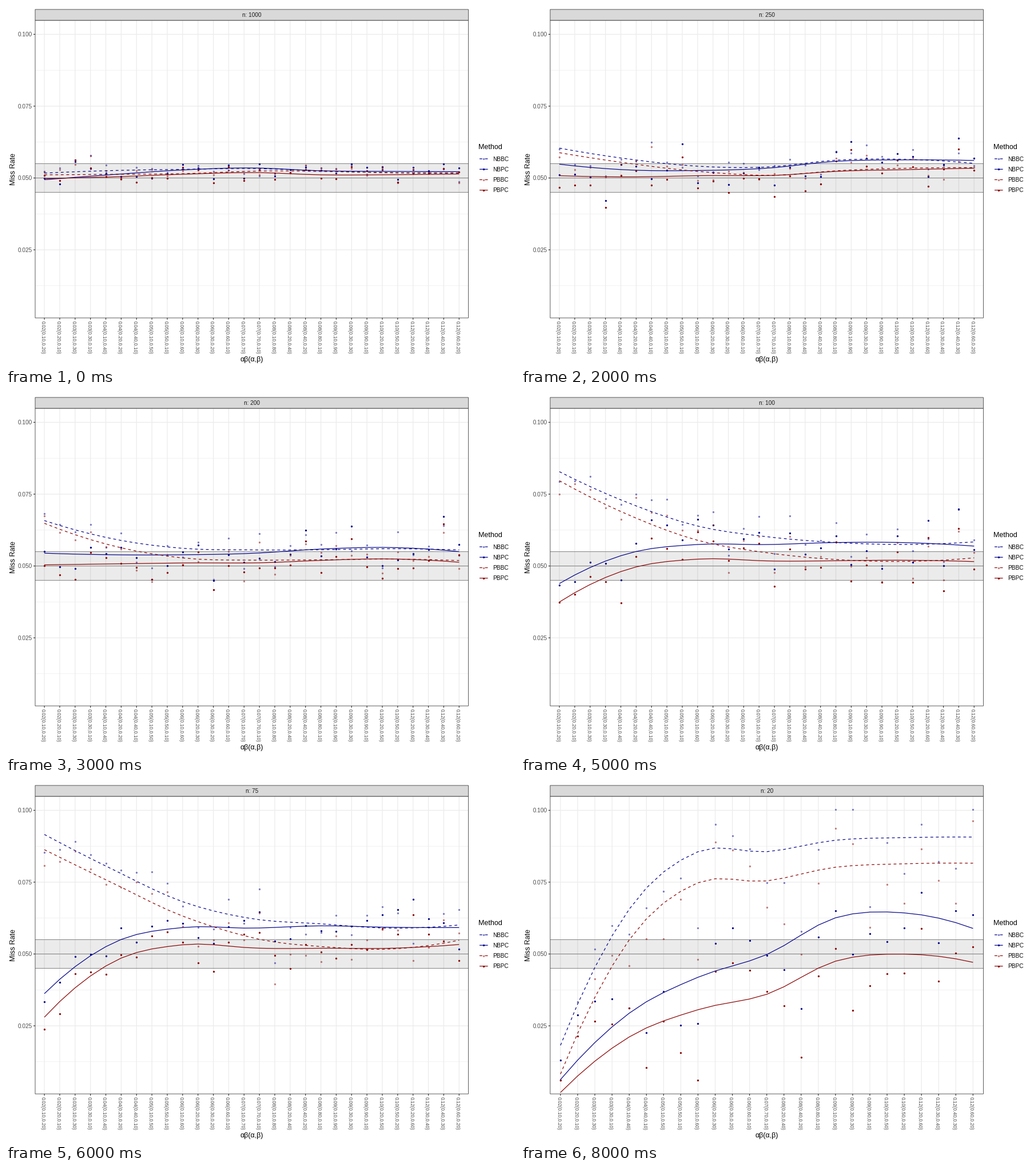
These frames come from a looping animation (890x629 px, 9 s). A matplotlib script:

```python
import numpy as np
import matplotlib.pyplot as plt
from matplotlib.animation import FuncAnimation
from matplotlib.patches import Rectangle

W, H, DPI = 890, 629, 100
LEFT, RIGHT, TOP, BOTTOM = 51, 808.4, 25, 545
NAVY, RED, INK, GRID = "#00008B", "#8B0000", "#333333", "#EBEBEB"
METHODS = {"NBBC": (NAVY, True), "NBPC": (NAVY, False),
           "PBBC": (RED, True), "PBPC": (RED, False)}
SIZES = [1000, 500, 250, 200, 150, 100, 75, 50, 20]

plt.rcParams["font.family"] = "Liberation Sans"


def pt(px):
    return px * 72 / DPI


def y_of(rate):
    return 300.5 - (rate - 0.05) * 5020


# Evenly spaced key points, in 1/10000: the NBBC and NBPC curves,
# then how far PBBC and PBPC lie below them.
keys = {}


def shape(n, *rows):
    keys[n] = [np.array(r, float) for r in rows]


def mix(n, a, b, t=0.5):
    keys[n] = [(1 - t) * p + t * q for p, q in zip(keys[a], keys[b])]


shape(1000, [517, 526, 530, 533, 525, 518, 517], [494, 512, 528, 535, 525, 523, 522],
      [6, 15, 2, -1], [-4, 15, 14, 8])
shape(250, [604, 566, 541, 538, 562, 565, 551], [548, 528, 526, 534, 558, 563, 561],
      [16, 18, 37, 15], [40, 18, 35, 27])
shape(150, [712, 622, 582, 574, 551, 555, 561], [541, 550, 552, 554, 560, 566, 539],
      [3, 49, 33, 59], [41, 39, 44, 47])
shape(75, [916, 793, 682, 623, 605, 590, 601], [362, 539, 592, 590, 598, 593, 592],
      [53, 50, 79, 53], [82, 60, 78, 59])
shape(50, [733, 855, 818, 746, 681, 660, 667], [215, 497, 618, 634, 632, 636, 630],
      [94, 70, 94, 90], [107, 79, 94, 68])
shape(20, [182, 656, 856, 856, 896, 905, 907], [63, 294, 419, 498, 626, 643, 589],
      [100, 108, 94, 91], [45, 113, 151, 118])
mix(500, 1000, 250)
mix(200, 250, 150)
mix(100, 150, 75, 0.57)

PAIRS = sorted(((a, b) for a in range(1, 10) for b in range(1, 10)
                if 2 <= a * b <= 12), key=lambda p: (p[0] * p[1], p[0]))
UNUSED_AT_20 = {(2, 2), (1, 7), (1, 8)}


def smooth(vals, count):
    """Cubic Hermite curve through evenly spaced values."""
    slope = np.gradient(vals, edge_order=2)
    u = np.linspace(0, len(vals) - 1, count)
    i = np.minimum(u.astype(int), len(vals) - 2)
    t = u - i
    return ((1 + 2 * t) * (1 - t) ** 2 * vals[i] + t * (1 - t) ** 2 * slope[i]
            + t * t * (3 - 2 * t) * vals[i + 1] - t * t * (1 - t) * slope[i + 1])


def series(n, count):
    """Fitted curves and scattered rates, in METHODS order."""
    bc, pc, bc_gap, pc_gap = (smooth(k, count) for k in keys[n])
    fits = np.array([bc, pc, bc - bc_gap, pc - pc_gap])
    rng = np.random.default_rng(n)
    spread = 8 + 480 / np.sqrt(n)
    shared = rng.normal(0, 0.75, count)
    kind = rng.normal(0, 0.6, (2, count))
    own = rng.normal(0, 0.2, (4, count))
    obs = fits + spread * (shared + np.vstack([kind, kind]) + own)
    return fits / 1e4, np.clip(obs, 60, 1002) / 1e4


fig = plt.figure(figsize=(W / DPI, H / DPI), dpi=DPI, facecolor="white")
ax = fig.add_axes([0, 0, 1, 1])


def line(x, y, color, width=1.2, z=1, dashed=False):
    style = (0, (4, 4)) if dashed else "-"
    ax.plot(x, y, color=color, lw=pt(width), ls=style, zorder=z, snap=False,
            dash_capstyle="butt", solid_capstyle="butt")


def dots(x, y, color, faded, z=4):
    ax.scatter(x, y, s=pt(3.3) ** 2, color=color, lw=0,
               alpha=0.5 if faded else 1, zorder=z)


def text(x, y, s, px, color="black", ha="left", **kw):
    ax.text(x, y, s, fontsize=pt(px), color=color, ha=ha, va="baseline",
            rotation_mode="anchor", **kw)


def box(y0, y1, z, **kw):
    ax.add_patch(Rectangle((LEFT, y0), RIGHT - LEFT, y1 - y0,
                           zorder=z, snap=False, **kw))


def draw_panel(n, xs, pairs):
    for r in np.arange(0.0125, 0.1, 0.025):
        line([LEFT, RIGHT], [y_of(r)] * 2, GRID, 0.6, 0.5)
    for r in (0.025, 0.05, 0.075, 0.1):
        y = y_of(r)
        line([LEFT, RIGHT], [y, y], GRID)
        line([LEFT - 3, LEFT], [y, y], INK)
        text(46, y + 3.6, f"{r:.3f}", 10, "#4D4D4D", ha="right")
    for x, (a, b) in zip(xs, pairs):
        line([x, x], [TOP, BOTTOM], GRID)
        line([x, x], [BOTTOM, BOTTOM + 3], INK)
        text(x - 5.5, 550, f"{a * b / 100:.2f}({a / 10:.2f},{b / 10:.2f})", 8.55,
             "#4D4D4D", rotation=-90)

    box(y_of(0.055), y_of(0.045), 2, fc="black", alpha=0.08, lw=0)
    for r in (0.045, 0.05, 0.055):
        line([LEFT, RIGHT], [y_of(r)] * 2, "#808080", 1, 3)
    box(TOP, BOTTOM, 7, fill=False, ec=INK, lw=pt(0.8))
    box(6, TOP, 8, fc="#D9D9D9", ec=INK, lw=pt(0.8))
    mid = (LEFT + RIGHT) / 2
    text(mid, 19, f"n: {n}", 10, "#1A1A1A", ha="center", zorder=9)
    text(mid, 620.5, "αβ(α,β)", 12.5, ha="center")
    text(16, 285, "Miss Rate", 12.5, ha="center", rotation=90)


def draw_legend():
    text(826, 250, "Method", 12.5)
    for i, (name, (color, boot)) in enumerate(METHODS.items()):
        y = 267 + 18.25 * i
        line([828, 842.6], [y, y], color, z=5, dashed=boot)
        dots([835.3], [y], color, boot, 6)
        text(851, y + 3.7, name, 10)


def draw(i):
    ax.clear()
    ax.set_xlim(0, W)
    ax.set_ylim(H, 0)
    ax.axis("off")
    n = SIZES[i]
    pairs = [p for p in PAIRS if n > 20 or p not in UNUSED_AT_20]
    step = (RIGHT - LEFT) / (len(pairs) + 0.2)
    xs = LEFT + step * (0.6 + np.arange(len(pairs)))
    draw_panel(n, xs, pairs)
    for (color, boot), fit, obs in zip(METHODS.values(), *series(n, len(pairs))):
        dots(xs, y_of(obs), color, boot)
        line(xs, y_of(fit), color, z=5, dashed=boot)
    draw_legend()
    return []


anim = FuncAnimation(fig, draw, frames=len(SIZES), init_func=lambda: [],
                     interval=1000, repeat=True, repeat_delay=0)
plt.show()
```
